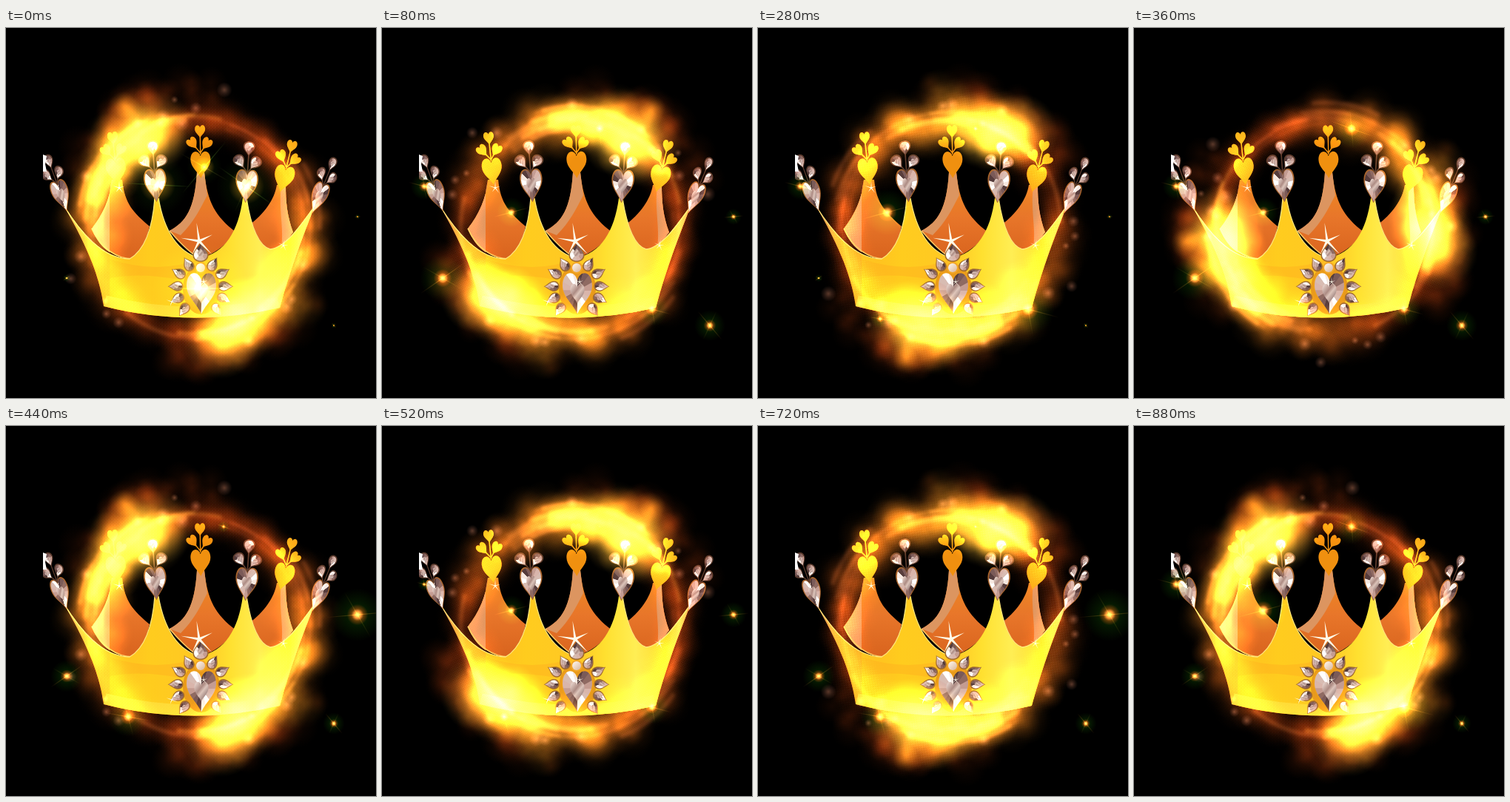
These frames come from a looping animation (500 px wide and 500 px high, 0.92 s). An HTML page with a canvas:

```html
<!DOCTYPE html>
<html lang="en">
<head>
<meta charset="utf-8">
<title>Crown of fire</title>
<style>
html, body { margin: 0; width: 100%; height: 100%; overflow: hidden; background: #000; }
canvas { display: block; width: 500px; height: 500px; }
</style>
</head>
<body>
<canvas id="stage" width="500" height="500"></canvas>
<script>
const STEP = 40, LOOP = 920, TAU = Math.PI * 2, RAD = Math.PI / 180;
const stage = document.getElementById('stage').getContext('2d');

let seed = 11;
function rnd() {
  seed = (seed * 16807) % 2147483647;
  return seed / 2147483647;
}
const spread = () => rnd() + rnd() + rnd() - 1.5;

function layer(size) {
  const el = document.createElement('canvas');
  el.width = el.height = size;
  return el.getContext('2d');
}

function glow(c, x, y, r, rgb, a) {
  const g = c.createRadialGradient(x, y, 0, x, y, r);
  g.addColorStop(0, `rgba(${rgb},${a})`);
  g.addColorStop(0.5, `rgba(${rgb},${a * 0.42})`);
  g.addColorStop(1, `rgba(${rgb},0)`);
  c.fillStyle = g;
  c.fillRect(x - r, y - r, 2 * r, 2 * r);
}

function placed(c, x, y, deg, sx, sy, draw) {
  c.save();
  c.translate(x, y);
  c.rotate(deg * RAD);
  c.scale(sx, sy);
  draw();
  c.restore();
}

function fillPath(c, d, fill) {
  c.fillStyle = fill;
  c.fill(new Path2D(d));
}

function across(c, x0, y0, x1, y1, stops) {
  const g = c.createLinearGradient(x0, y0, x1, y1);
  stops.forEach(([at, col]) => g.addColorStop(at, col));
  return g;
}

// Unit shapes, centred, point downwards
const HEART = new Path2D('M0 .5C-.15 .25-.5 .08-.5-.2C-.5-.56-.1-.6 0-.33C.1-.6 .5-.56 .5-.2C.5 .08 .15 .25 0 .5Z');
const PEAR = new Path2D('M0 .5C-.16 .25-.5 .1-.5-.16C-.5-.38-.26-.5 0-.5C.26-.5 .5-.38 .5-.16C.5 .1 .16 .25 0 .5Z');

// ---------- crown ----------
const TINTS = ['#f6e8e0', '#8f6a62', '#d8bcb2', '#553c3c', '#c49c92', '#ffffff', '#7a5a58', '#d9b5ab'];

function gem(c, shape, x, y, w, h, deg, rim) {
  placed(c, x, y, deg, w + 3, h + 3, () => { c.fillStyle = rim; c.fill(shape); });
  placed(c, x, y, deg, w, h, () => {
    const g = c.createConicGradient(rnd() * TAU, 0, -0.08);
    const n = w > 18 ? 16 : 8;
    for (let i = 0; i < n; i++) {
      const tint = TINTS[(i * 3) % 8];
      g.addColorStop(i / n, tint);
      g.addColorStop((i + 0.9) / n, tint);
    }
    c.fillStyle = g;
    c.fill(shape);
    c.scale(0.48, 0.48);
    c.fillStyle = across(c, -0.5, -0.5, 0.4, 0.5,
      [[0, '#f3e2da'], [0.4, '#ad8c84'], [0.55, '#dcc4ba'], [1, '#6c5050']]);
    c.fill(shape);
  });
}

// A large heart with a sprig of three small ones above it
const SPRIG = [[0, -45, 0], [-10, -29, -35], [8, -28, 35]];

function sprig(c, x, y, tilt, o) {
  placed(c, x, y, tilt, o.thin * o.size, o.size, () => {
    c.strokeStyle = o.stem;
    c.lineWidth = 1.5;
    c.beginPath();
    c.moveTo(0, -14); c.lineTo(0, -38);
    c.moveTo(-7, -25); c.lineTo(0, -16); c.lineTo(6, -25);
    c.stroke();
    for (const [px, py, deg] of SPRIG) {
      if (o.gem) gem(c, PEAR, px, py, 11, 15, deg, '#5a3a2c');
      else placed(c, px, py, deg, 14, 17, () => { c.fillStyle = o.fill; c.fill(HEART); });
    }
    if (o.gem) gem(c, HEART, 0, 0, 24, 37, 0, '#a8642c');
    else placed(c, 0, 0, 0, 27, 36, () => { c.fillStyle = o.fill; c.fill(HEART); });
  });
}

function star(c, x, y, r, points, turn) {
  c.beginPath();
  for (let i = 0; i < points * 2; i++) {
    const a = turn * RAD + i * Math.PI / points;
    const d = i % 2 ? r * 0.11 : r * (i % 4 ? 0.8 : 1);
    c.lineTo(x + d * Math.cos(a), y + d * Math.sin(a));
  }
  c.closePath();
  c.fillStyle = '#fffbe8';
  c.fill();
}

function brooch(c) {
  c.fillStyle = '#e89a1c';
  c.beginPath();
  c.ellipse(264, 353, 25, 34, 0, 0, TAU);
  c.fill();
  // Leaves point away from the middle stone
  for (const [dx, y] of [[17, 319], [30, 331], [34, 349], [32, 366], [23, 381]]) {
    for (const x of [-dx, dx]) {
      gem(c, PEAR, 263 + x, y, 11, 18, Math.atan2(y - 348, x) / RAD - 90, '#a06a2c');
    }
  }
  gem(c, PEAR, 263, 303, 18, 23, 180, '#a06a2c');
  c.fillStyle = '#f3a626';
  c.beginPath(); c.arc(263, 324, 8, 0, TAU); c.fill();
  c.fillStyle = across(c, 258, 318, 269, 330, [[0, '#fff8ee'], [1, '#d8b49a']]);
  c.beginPath(); c.arc(263, 324, 6, 0, TAU); c.fill();
  gem(c, HEART, 264, 359, 40, 55, 0, '#f0a018');
}

function buildCrown() {
  const c = layer(500);
  const orange = across(c, 0, 200, 0, 310, [[0, '#ee8c22'], [0.5, '#e8762a'], [1, '#d9641e']]);
  const peach = '#dc9560';

  fillPath(c, 'M143 205C141 230 131 252 116 271C128 298 150 312 172 312C184 305 190 288 194 268C173 250 160 238 157 205Z', orange);
  fillPath(c, 'M143 205C141 230 131 252 116 271C122 286 130 297 140 303V222Z', peach);
  fillPath(c, 'M258 195C255 245 243 262 221 274C238 294 255 309 262 311C285 305 302 288 311 276C283 255 272 235 268 195Z', orange);
  fillPath(c, 'M258 195C255 245 243 262 221 274L236 280C254 262 262 245 272 226L268 195Z', peach);
  fillPath(c, 'M366 212C363 232 348 252 329 266C336 285 347 301 366 300L388 276C380 254 378 235 378 212Z', orange);
  fillPath(c, 'M372 212C368 245 376 270 372 298L388 276C380 254 378 235 378 212Z', peach);

  c.strokeStyle = '#ffc861';
  c.lineWidth = 1.5;
  c.stroke(new Path2D('M116 271C128 298 150 312 172 312M221 274C238 294 255 309 262 311M329 266C336 285 347 301 366 300'));

  const topLeft = 'M78 240C100 275 130 312 167 312C188 300 198 270 201 230';
  const front = topLeft + 'H206C214 275 232 303 262 311C296 304 314 275 320 230H325'
    + 'C331 268 341 294 357 299C378 297 399 266 417 241'
    + 'C402 280 384 325 370 378Q250 406 132 376C126 330 104 285 78 240Z';
  const gold = across(c, 80, 0, 417, 0, [[0, '#e8a45c'], [0.1, '#e6a428'], [0.178, '#e9aa24'], [0.18, '#ffbe20'],
    [0.34, '#ffcc1e'], [0.55, '#ffc824'], [0.66, '#ffe030'], [0.78, '#ffee54'], [0.9, '#ffd228'], [1, '#e8a860']]);
  c.save();
  c.clip(new Path2D(front));
  c.fillStyle = gold;
  c.fillRect(0, 200, 500, 220);
  fillPath(c, 'M140 312Q205 334 262 312L235 340Q180 330 140 338Z', 'rgba(255,165,30,.35)');
  c.strokeStyle = 'rgba(255,232,80,.5)';
  c.lineWidth = 30;
  c.stroke(new Path2D('M132 376Q250 406 370 378'));
  c.restore();
  c.strokeStyle = '#ffe67a';
  c.lineWidth = 1.3;
  c.stroke(new Path2D(topLeft + 'M206 230C214 275 232 303 262 311M325 230C331 268 341 294 357 299C378 297 399 266 417 241'));

  const plain = (fill) => ({ fill, stem: fill, thin: 1, size: 1 });
  sprig(c, 149, 194, -6, plain('#ffb21c'));
  sprig(c, 263, 185, -1, plain('#f0900f'));
  sprig(c, 375, 204, 14, plain('#f8a818'));
  const jewel = (thin, size) => ({ gem: true, stem: '#5a3a2c', thin, size });
  sprig(c, 202, 213, -4, jewel(1, 1.13));
  sprig(c, 325, 214, 4, jewel(1, 1.13));
  sprig(c, 75, 227, -20, jewel(0.8, 1.1));
  sprig(c, 422, 230, 22, jewel(0.75, 1.1));
  fillPath(c, 'M50 171L55 173L53 184L55 194H50Z', '#fff');
  c.clearRect(0, 160, 50, 60);

  brooch(c);
  star(c, 261, 288, 25, 5, -98);
  star(c, 153, 216, 9, 5, -90);
  star(c, 375, 294, 8, 5, -80);
  star(c, 224, 370, 8, 4, 20);
  star(c, 267, 343, 7, 5, -90);
  return c.canvas;
}

// ---------- ring of fire ----------
const HEADS = [72, 241];
const TAIL = 125;

// Heat along the ring: steep in front of each head, a long tail behind it
function heat(deg) {
  let sum = 0;
  for (const h of HEADS) {
    const behind = ((h - deg + 20) % 360 + 360) % 360 - 20;
    if (behind < 0) sum += 1 + behind / 20;
    else if (behind < TAIL) sum += 1 - behind / TAIL;
  }
  return Math.min(1, sum);
}

function buildRing() {
  const c = layer(460);
  c.fillStyle = '#000';
  c.fillRect(0, 0, 460, 460);
  c.globalCompositeOperation = 'lighter';
  const at = (deg, r) => [230 + r * Math.cos(deg * RAD), 230 + r * Math.sin(deg * RAD)];

  for (let i = 0; i < 760; i++) {
    const deg = rnd() * 360, k = heat(deg);
    const [x, y] = at(deg, 145 + spread() * (15 + 25 * k));
    const rgb = [200 + 55 * k, 68 + 107 * k, 14 + 26 * k].map(Math.round).join();
    glow(c, x, y, 14 + rnd() * 20, rgb, 0.045 + 0.1 * k);
  }
  for (const h of HEADS) {
    for (let i = 0; i < 50; i++) {
      const [x, y] = at(h + spread() * 34, 164 + rnd() * 32);
      glow(c, x, y, 14 + rnd() * 16, '150,52,12', 0.13);
    }
    for (let i = 0; i < 8; i++) {
      const [x, y] = at(h + 6 - i * 5, 140 + spread() * 16);
      glow(c, x, y, 52 - i * 3, '255,195,60', 0.42 - i * 0.035);
    }
  }
  // Soft strands following the ring, then pale embers
  c.filter = 'blur(2px)';
  for (let i = 0; i < 40; i++) {
    const deg = rnd() * 360, k = heat(deg);
    c.strokeStyle = `rgba(255,${Math.round(120 + 70 * k)},70,${0.16 + 0.14 * k})`;
    c.lineWidth = 2 + rnd() * 6;
    c.beginPath();
    c.arc(230 + spread() * 8, 230 + spread() * 8, 145 + spread() * 14, deg * RAD, (deg + 20 + rnd() * 35) * RAD);
    c.stroke();
  }
  c.filter = 'none';
  for (let i = 0; i < 18; i++) {
    const [x, y] = at(rnd() * 360, 160 + spread() * 22);
    glow(c, x, y, 5 + rnd() * 6, '225,140,105', 0.4);
  }
  return c.canvas;
}

// ---------- sparkles ----------
// x, y, step of greatest size in a cycle of seven, size, tilt of rays
const SPARKS = [
  [294, 136, 1.8, 0.9, 20], [475, 255, 4.2, 1.2, -5], [82, 338, 2.6, 1.1, -35], [165, 393, 5, 1.1, 10],
  [443, 402, 2.6, 0.75, 50], [57, 214, 1, 0.75, 15], [175, 249, 0.5, 1.1, -15], [365, 380, 0.5, 1.25, 15]
];

function ray(x, y, len, deg, rgb, a) {
  placed(stage, x, y, deg, 1, 1, () => {
    stage.fillStyle = across(stage, -len, 0, len, 0,
      [[0, `rgba(${rgb},0)`], [0.5, `rgba(${rgb},${a})`], [1, `rgba(${rgb},0)`]]);
    stage.fillRect(-len, -0.6, 2 * len, 1.2);
  });
}

function sparkle(x, y, s, tilt) {
  glow(stage, x, y, 30 * s, '14,60,4', 0.8);
  ray(x, y, 36 * s, tilt, '170,110,30', 0.45);
  ray(x, y, 30 * s, tilt + 65, '130,110,25', 0.35);
  glow(stage, x, y, 12 * s, '255,70,15', 1);
  glow(stage, x, y, 7 * s, '255,190,120', 1);
}

// The opening flash on the jewels
function flash() {
  for (const [x, y, r, tilt] of [[205, 212, 24, 3], [268, 188, 14, -50], [325, 214, 24, 35], [262, 352, 38, 0]]) {
    glow(stage, x, y, r * 1.7, '20,60,5', 0.5);
    glow(stage, x, y, r, '255,150,30', 0.6);
    glow(stage, x, y, r * 0.4, '255,240,170', 0.6);
    ray(x, y, 46, tilt, '110,170,50', 0.45);
    ray(x, y, 38, tilt + 80, '150,150,50', 0.3);
  }
}

const crown = buildCrown();
const ring = buildRing();

function draw(now) {
  const step = Math.floor((now % LOOP) / STEP);
  stage.globalCompositeOperation = 'source-over';
  stage.fillStyle = '#000';
  stage.fillRect(0, 0, 500, 500);
  stage.drawImage(crown, 0, 0);
  stage.globalCompositeOperation = 'lighter';
  placed(stage, 258, 267, step * 360 / 11, 1, 1, () => stage.drawImage(ring, -230, -230));

  for (const [x, y, peak, size, tilt] of SPARKS) {
    const k = 0.5 + 0.5 * Math.cos((step - peak) * TAU / 7);
    // The jewels' flash stands in for the larger sparkles
    if (step === 0 && k > 0.2) continue;
    if (k > 0.06) sparkle(x, y, size * k, tilt);
  }
  if (step === 0) flash();
}

function tick() {
  draw(performance.now());
  requestAnimationFrame(tick);
}
tick();
</script>
</body>
</html>
```
